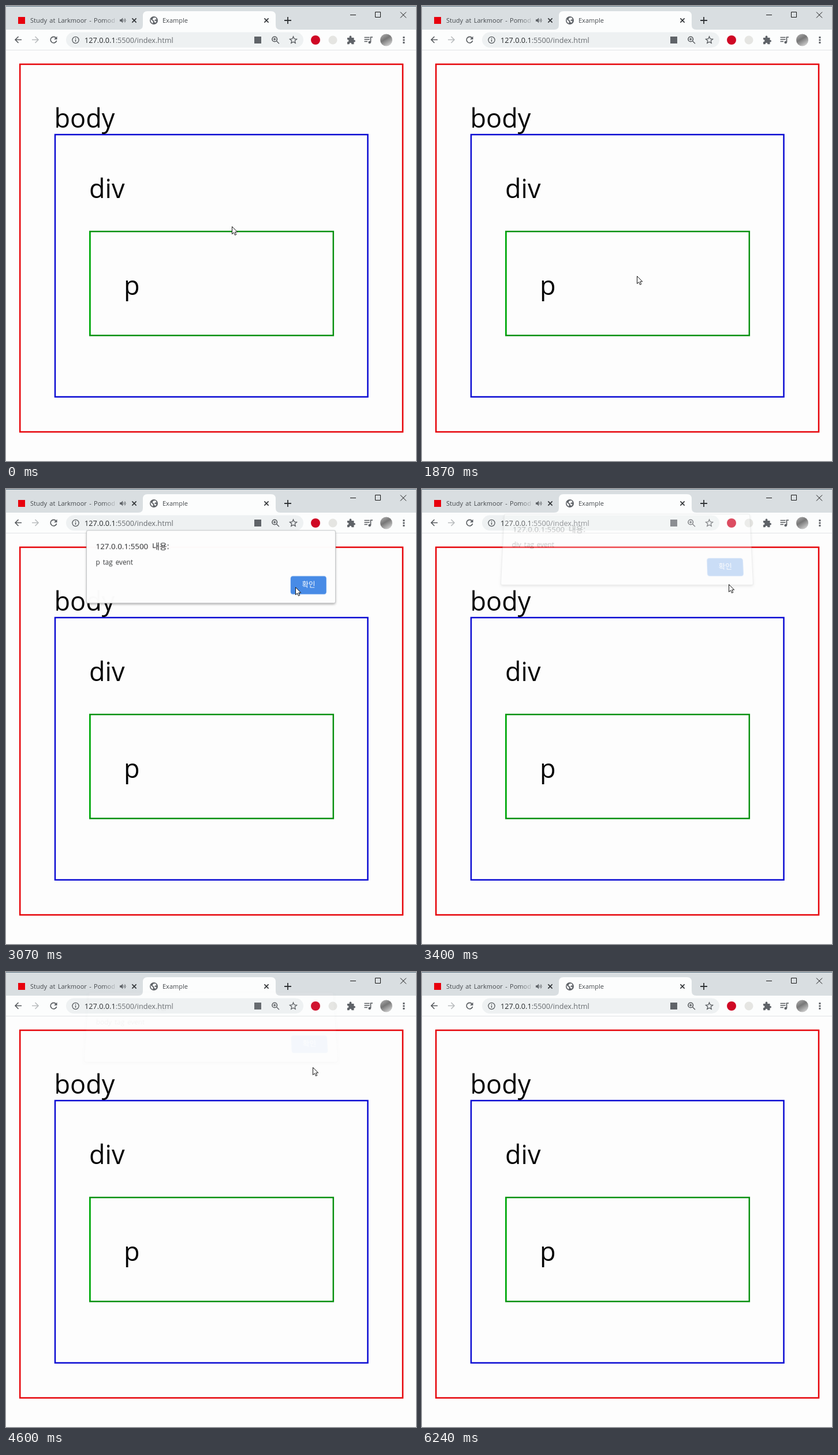
An HTML page for the animation above (6280 ms loop, 710 px wide and 789 px high).

```html
<!DOCTYPE html>
<html lang="ko">
<head>
<meta charset="utf-8">
<title>Example</title>
<style>
  html, body { margin: 0; width: 100%; height: 100%; overflow: hidden; background: #fdfdfd; }
  svg { position: absolute; left: 0; top: 0; display: block; overflow: visible; }
  text { font-family: "Open Sans", "Noto Sans", "Noto Sans CJK KR", "Noto Sans CJK", sans-serif; }
  .label { font-size: 45px; fill: #050505; }
  .tab { font-size: 11px; fill: #45494d; word-spacing: 1.5px; }
  .icon { fill: none; stroke: #55595d; stroke-width: 1.6; }
  .solid { fill: #5f6368; stroke: none; }
  #dialog {
    position: absolute; left: 140px; top: 73px; width: 430px; height: 125px;
    background: #fdfdfd; border-radius: 2px; visibility: hidden;
    box-shadow: 0 0 0 1px #c3c5c7, 0 2px 4px rgba(0, 0, 0, .42);
  }
  #message { font-size: 11.7px; word-spacing: 2px; fill: #303234; }
</style>
</head>
<body>
<svg width="710" height="789" viewBox="0 0 710 789">
  <defs>
    <linearGradient id="fade">
      <stop offset=".86" stop-color="#45494d"/>
      <stop offset="1" stop-color="#45494d" stop-opacity="0"/>
    </linearGradient>
    <linearGradient id="portrait" x2=".6" y2="1">
      <stop stop-color="#b4b4b4"/>
      <stop offset=".5" stop-color="#777"/>
      <stop offset="1" stop-color="#c9c9c9"/>
    </linearGradient>
    <clipPath id="title"><rect x="40" y="12" width="149" height="26"/></clipPath>
    <path id="close" d="M-3.6-3.6 3.6 3.6M3.6-3.6-3.6 3.6" fill="none" stroke="#303336" stroke-width="1.6"/>
  </defs>

  <!-- Tab strip -->
  <rect width="710" height="41" fill="#d9dee1"/>
  <rect width="710" height="1" fill="#5d7484"/>
  <path d="M229 41q8 0 8-8V17q0-8 8-8h214q8 0 8 8v16q0 8 8 8z" fill="#fcfdfd"/>
  <rect x="21" y="19" width="12" height="12" fill="#e8000d"/>
  <g clip-path="url(#title)">
    <text class="tab" x="42" y="29" style="fill:url(#tabFade)">Study at Larkmoor - Pomodoro</text>
  </g>
  <linearGradient id="tabFade" gradientUnits="userSpaceOnUse" x1="42" x2="190">
    <stop offset=".86" stop-color="#45494d"/>
    <stop offset="1" stop-color="#45494d" stop-opacity=".15"/>
  </linearGradient>
  <path class="solid" d="M197 23.3h2.3l3-2.8v9l-3-2.8H197z"/>
  <path class="icon" d="M204 23q1.6 2 0 4M205.700 21.500q3 3.500 0 7" style="stroke-width:1"/>
  <use href="#close" x="222" y="25"/>
  <circle class="solid" cx="256" cy="25" r="7"/>
  <path d="M250.500 23l4 3.600v3.400q-4-1-4-7M255 20.500l4-.6 1.800 3.300-2.600.2-1.300 2.200 3.600.5-1.300 3-2.400-1.200-.6-2.700-2.700-1.700z" fill="#fcfdfd"/>
  <text class="tab" x="271" y="29">Example</text>
  <use href="#close" x="451" y="25"/>
  <path d="M482 25h12M488 19v12" stroke="#303336" stroke-width="1.8"/>
  <path d="M596 15.500h10M639.500 10.500h9v9h-9zM683 10.500l10 10M693 10.500l-10 10" fill="none" stroke="#151515"/>

  <!-- Toolbar -->
  <rect y="41" width="710" height="35" fill="#fcfdfd"/>
  <rect y="76" width="710" height="1" fill="#e2e4e5"/>
  <rect x="104" y="45.500" width="411" height="26.500" rx="13.250" fill="#eef1f2"/>
  <path id="arrow" class="icon" d="M27 58.500H16M21.500 53l-5.500 5.500 5.500 5.500"/>
  <path class="icon" d="M45 58.500h11M50.500 53l5.500 5.500-5.500 5.500" style="stroke:#b9bcbe"/>
  <path class="icon" d="M86.600 55.300a5.300 5.300 0 1 0 1 4.700"/>
  <path class="solid" d="M88.500 52.500v5.500H83z"/>
  <circle class="icon" cx="120.500" cy="59" r="5.600" style="stroke-width:1.300"/>
  <path d="M120.500 58v4M120.500 55.500v1.400" stroke="#55595d" stroke-width="1.400"/>
  <text x="136" y="63.500" font-size="12.700" fill="#25282b">127.0.0.1<tspan fill="#666a6e">:5500/index.html</tspan></text>
  <rect class="solid" x="430" y="53" width="12" height="12"/>
  <g class="icon">
    <circle cx="465.200" cy="57.500" r="4.300"/>
    <path d="M468.500 60.800l4.500 4.500M463 57.500h4.400M465.200 55.300v4.400" stroke-width="1.300"/>
    <path d="M497.500 53l1.700 4 4.300.4-3.300 2.800 1 4.200-3.700-2.200-3.700 2.200 1-4.200-3.300-2.800 4.300-.4z" stroke-width="1.300"/>
  </g>
  <circle cx="536" cy="59" r="8" fill="#cf0824"/>
  <circle cx="566" cy="59" r="7.500" fill="#e5e5e2"/>
  <path class="solid" d="M591 55h3.700q-.6-3.500 1.800-3.500T598.300 55h4.200v4q2.500-.4 2.500 1.700t-2.500 1.700v3.900h-4q0-2.500-2-2.500t-2 2.500H591v-4q2.500 0 2.500-2t-2.500-2z"/>
  <path class="icon" d="M620.500 54.500h9M620.500 58h9M620.500 61.500h5.500M631.500 63v-9h3.500"/>
  <circle class="solid" cx="629.700" cy="63" r="2.300"/>
  <circle cx="658.500" cy="59" r="10.500" fill="url(#portrait)"/>
  <path class="solid" d="M687.400 53h3v3h-3zm0 4.500h3v3h-3zm0 4.500h3v3h-3z"/>

  <!-- Page -->
  <g fill="none" stroke-width="2.500">
    <rect x="24.200" y="101" width="662.800" height="637.500" stroke="#e60208"/>
    <rect x="85" y="223" width="541.500" height="454.800" stroke="#0808d2"/>
    <rect x="145.300" y="391" width="421.500" height="180.300" stroke="#08900f"/>
    <path d="M145.300 392v178" stroke="#00ac0c"/>
  </g>
  <text class="label" x="83.500" y="210.500">body</text>
  <text class="label" x="144" y="333">div</text>
  <text class="label" x="204" y="500.500">p</text>
</svg>

<div id="dialog">
  <svg width="430" height="125" viewBox="140 73 430 125">
    <clipPath id="buttonClip"><rect x="493" y="152" width="61.500" height="31" rx="4"/></clipPath>
    <text x="155.500" y="105" font-size="13.400" fill="#202224">127.0.0.1:5500</text>
    <text x="253" y="105" font-size="14" fill="#202224">내용:</text>
    <text id="message" x="155.500" y="132"></text>
    <rect x="492.500" y="151.500" width="62.500" height="32" rx="4.500" fill="#a9c9f3"/>
    <rect x="493" y="152" width="61.500" height="31" rx="4" fill="#4489e6"/>
    <circle id="ripple" cx="531" cy="163" fill="#fff" clip-path="url(#buttonClip)"/>
    <text x="524" y="171.300" font-size="12.500" fill="#fff" text-anchor="middle">확인</text>
  </svg>
</div>

<svg id="cursor" width="12" height="18" viewBox="0 0 12 18">
  <path d="M.5.500v13l3-2.800 2 4.600 2.200-1-2-4.400h4z" fill="#fff" stroke="#151515"/>
</svg>

<script>
  const LOOP = 6280;
  const FADE = 200;
  const PRESS = 120;
  const HIDE_CURSOR = 5800;

  // time, x, y of the pointer tip
  const path = [
    [0, 391, 382], [250, 391, 382], [1000, 341, 291], [1200, 341, 291],
    [1700, 372, 468], [1960, 372, 468], [2270, 436, 262], [2650, 501, 170],
    [3120, 501, 170], [3400, 531, 165], [LOOP, 531, 165]
  ];

  // open, close, tag
  const alerts = [[1960, 3050, "p"], [3340, 4290, "div"], [4560, 5270, "body"]];

  const byId = id => document.getElementById(id);
  const [dialog, message, ripple, cursor] = ["dialog", "message", "ripple", "cursor"].map(byId);
  const clamp = v => Math.min(1, Math.max(0, v));
  const smooth = u => u * u * (3 - 2 * u);

  function pointAt(t) {
    const i = path.findIndex(key => key[0] > t);
    const [t0, x0, y0] = path[i - 1];
    const [t1, x1, y1] = path[i];
    const u = smooth((t - t0) / (t1 - t0));
    return [x0 + (x1 - x0) * u, y0 + (y1 - y0) * u];
  }

  function drawDialog(t, x, y) {
    const alert = alerts.find(([open, close]) => t >= open && t < close + FADE);
    dialog.style.visibility = alert ? "visible" : "hidden";
    if (!alert) return;
    const [open, close, tag] = alert;
    const away = Math.max(clamp(1 - (t - open) / FADE), clamp((t - close) / FADE)) ** 2;
    dialog.style.opacity = clamp(1 - 1.5 * away);
    dialog.style.transform = away
      ? `perspective(900px) translateY(${-65 * away}px) rotateX(${24 * away}deg)`
      : "none";
    message.textContent = `${tag} tag event`;

    const press = clamp((t - close + PRESS) / PRESS);
    ripple.setAttribute("cx", x);
    ripple.setAttribute("cy", y - 2);
    ripple.setAttribute("r", press * 40);
    ripple.setAttribute("opacity", 0.18 * (1 - press));
  }

  function draw(t) {
    const [x, y] = pointAt(t);
    cursor.style.visibility = t < HIDE_CURSOR ? "visible" : "hidden";
    cursor.style.transform = `translate(${Math.round(x)}px, ${Math.round(y)}px)`;
    drawDialog(t, x, y);
  }

  const start = performance.now();
  function tick() {
    draw((performance.now() - start) % LOOP);
    requestAnimationFrame(tick);
  }
  tick();
</script>
</body>
</html>
```
